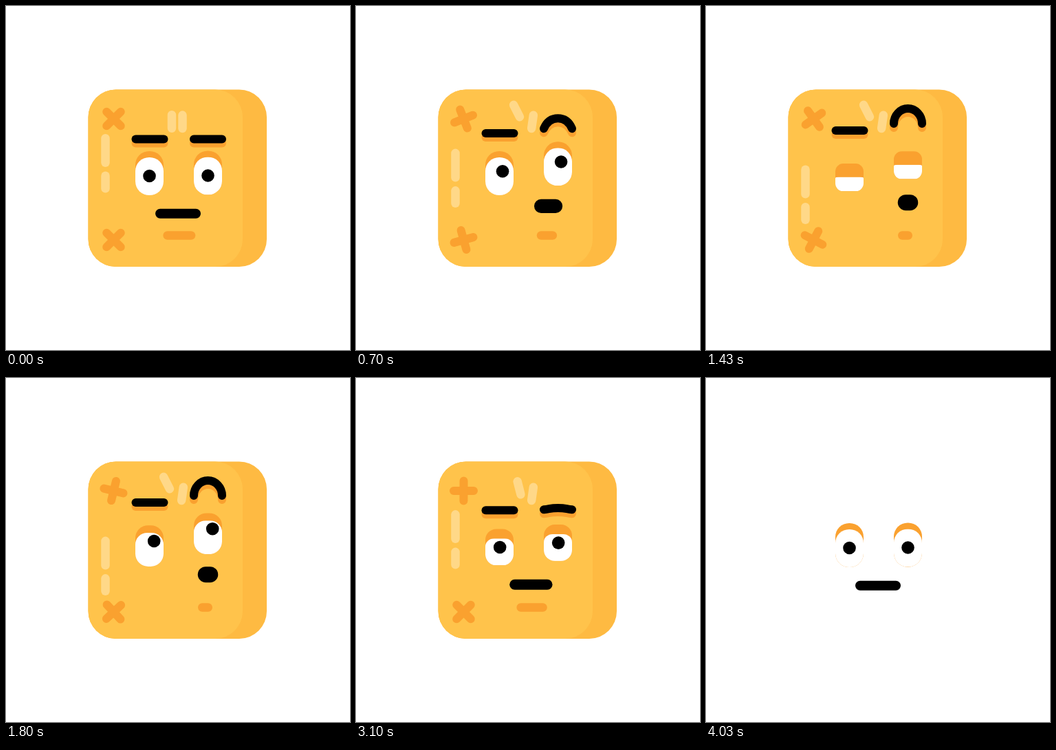
An HTML page with a canvas that plays this animation: 500x500 px, repeating every 4.06 s.

```html
<!DOCTYPE html>
<html lang="en">
<head>
<meta charset="utf-8">
<title>Raised eyebrow</title>
<style>
html, body { margin: 0; width: 100%; height: 100%; overflow: hidden; background: #fff; }
canvas { display: block; }
</style>
</head>
<body>
<canvas id="stage" width="500" height="500"></canvas>
<script>
const LOOP = 4060;
const ORANGE = '#faa12f', GLOSS = '#ffd888', BLACK = '#000', WHITE = '#fff';
const c = document.getElementById('stage').getContext('2d');

const mix = (a, b, k) => a + (b - a) * k;
const ramp = (t, from, to) => Math.min(1, Math.max(0, (t - from) / (to - from)));
const smooth = x => x * x * (3 - 2 * x);
const ease = (t, from, to) => smooth(ramp(t, from, to));

function box(x, y, w, h, r, color) {
  c.fillStyle = color;
  c.beginPath();
  c.roundRect(x, y, w, h, r);
  c.fill();
}

function pill(cx, cy, w, h, color) {
  box(cx - w / 2, cy - h / 2, w, h, Math.min(w, h) / 2, color);
}

function turned(x, y, degrees, draw) {
  c.save();
  c.translate(x, y);
  c.rotate(degrees * Math.PI / 180);
  draw();
  c.restore();
}

function cross(x, y, degrees) {
  turned(x, y, 45 + degrees, () => {
    pill(0, 0, 41, 12, ORANGE);
    pill(0, 0, 12, 41, ORANGE);
  });
}

function gloss(x, y, degrees, h) {
  turned(x, y, degrees, () => pill(0, 0, 12.5, h, GLOSS));
}

// The right brow bends from a straight bar into a half circle.
function arch(k, dy, color) {
  const x = 293.5, end = mix(193.5, 171, k) + dy, top = mix(193.5, 149, k) + dy;
  const side = mix(9.5, 20.5, k), bend = mix(193.5, 159, k) + dy;
  c.strokeStyle = color;
  c.lineWidth = 12;
  c.lineCap = 'round';
  c.beginPath();
  c.moveTo(x - 20.5, end);
  c.bezierCurveTo(x - side, bend, x - 11.3, top, x, top);
  c.bezierCurveTo(x + 11.3, top, x + side, bend, x + 20.5, end);
  c.stroke();
}

function eye(x, y, shut, look) {
  const top = y - 36 + 19 * shut, bottom = y + 28 - 6 * shut;
  const lid = y - 27 + 30 * shut, left = x - 20.5;
  const r = mix(20, 11, shut), corner = { x: mix(20, 4, shut), y: mix(20, 1, shut) };
  box(left, top, 41, bottom - top, r, ORANGE);
  c.save();
  c.beginPath();
  c.roundRect(left, lid, 41, bottom - lid, [corner, corner, r, r]);
  c.clip();
  c.fillStyle = WHITE;
  c.fillRect(left, lid, 41, bottom - lid);
  pill(x + 6.7 * look, y - 10 * look, 18.6, 18.6, BLACK);
  c.restore();
}

function pose(t) {
  const back = ramp(t, 2130, 3240);
  const out = 1 - Math.pow(1 - ramp(t, 0, 1110), 1.14);
  return {
    look: out - mix(back, smooth(back), 0.3),
    lift: ramp(t, 0, 920) - ramp(t, 2583, 3370),
    tilt: ramp(t, 0, 550) - ramp(t, 2850, 3380),
    lean: ramp(t, 0, 270) - ramp(t, 3110, 3380),
    slide: ease(t, 0, 1450) - ease(t, 1640, 3536),
    shut: ease(t, 750, 1060) - ease(t, 1350, 1960) + ease(t, 2990, 3230) - ease(t, 3300, 3600),
    topSpin: 360 * ease(t, 100, 3950),
    lowSpin: -360 * ease(t, 0, 2690)
  };
}

function drawHead(p) {
  box(119.5, 121.5, 259.5, 257.5, 40, '#feba42');
  box(119.5, 121.5, 224.5, 257.5, 40, '#ffc34b');
  cross(156.5, 164, p.topSpin);
  cross(156.5, 340, p.lowSpin);
  gloss(144.5, 210 + 45.5 * p.slide, 0, 48);
  gloss(144.5, 256 + 45.5 * p.slide, 0, 31);
  gloss(mix(241, 233.5, p.tilt), mix(168, 152.5, p.tilt), -27 * p.tilt, 32);
  gloss(256.5, 168.3, 8 * p.lean, 32);
  const brow = 193.5 - 12.5 * p.look;
  pill(209, brow + 6, 53, 12, ORANGE);
  arch(p.look, 6, ORANGE);
  pill(209, brow, 53, 12, BLACK);
  arch(p.look, 0, BLACK);
  pill(mix(251.8, 289.5, p.look), 333.5, mix(47, 21, p.look), 12.5, ORANGE);
}

function draw(t) {
  const p = pose(t);
  c.clearRect(0, 0, 500, 500);
  // The head drops out for the last instant of the loop.
  if (t < 4030) drawHead(p);
  eye(208.5, 247, p.shut, p.look);
  eye(293.5, 246.5 - 17.3 * p.lift, p.shut, p.look);
  pill(mix(250, 293.5, p.look), mix(301.8, 285.7, p.look),
    mix(66, 29.5, p.look), mix(14, 23, p.look), BLACK);
}

const start = performance.now();
function tick() {
  draw((performance.now() - start) % LOOP);
  requestAnimationFrame(tick);
}
tick();
</script>
</body>
</html>
```
